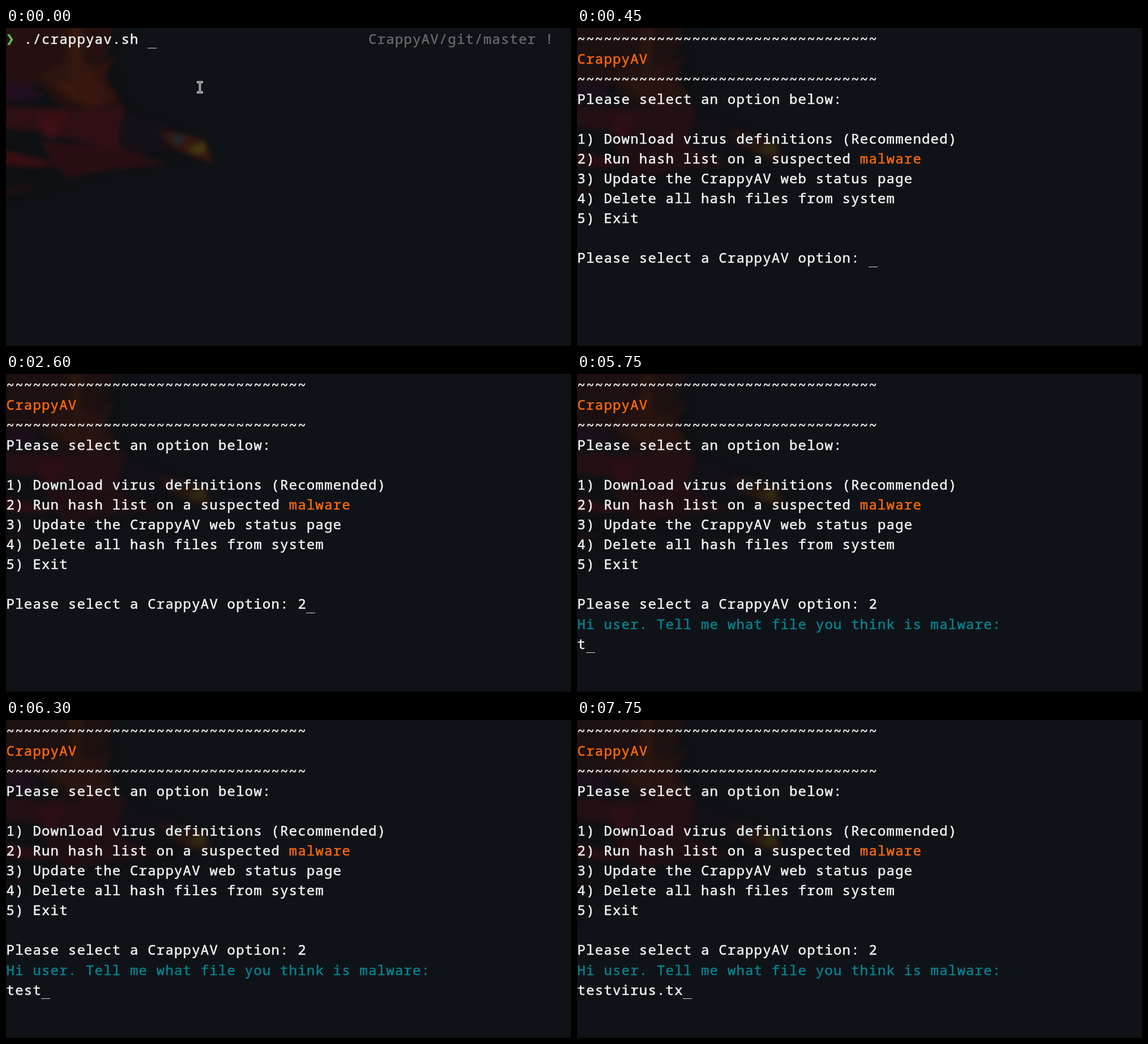
These frames come from a looping animation (998 by 561 pixels, 8 s). An HTML page with a canvas:

```html
<!DOCTYPE html>
<html lang="en">
<head>
<meta charset="utf-8">
<title>Terminal</title>
<style>
  html, body { margin: 0; width: 100%; height: 100%; overflow: hidden; background: #0f1317; }
  svg, canvas { position: absolute; left: 0; top: 0; }
  #wallpaper { filter: blur(5px); }
  #shade { filter: blur(16px); }
</style>
</head>
<body>
<svg width="998" height="561" viewBox="0 0 998 561">
  <path id="shade" fill="#0e1014" d="M-40-40H190L220 130 350 190 350 235 200 265 60 305-40 340Z"/>
  <g id="wallpaper">
    <path fill="#24110f" d="M-20-20H195L172 75 205 135 100 140 60 100H-20Z"/>
    <path fill="#2f150f" d="M60 85L105 60 112-20H140L135 60 165 70 195 45 172 90 200 130 150 142 110 125Z"/>
    <path fill="#38190f" d="M114-20H132L130 132 85 98 118 95Z"/>
    <path fill="#381510" d="M138 60L176 118 170 138 135 140Z"/>
    <path fill="#210f20" d="M-20 92L40 98 68 122-20 132Z"/>
    <path fill="#150f18" d="M208 145L290 172 350 198 270 216H195Z"/>
    <path fill="#2e1014" d="M-20 136L110 142 210 137 198 196 205 220 130 200 60 182-20 175Z"/>
    <path fill="#3c0f14" d="M58 152L110 150 85 198 64 190Z"/>
    <path fill="#2a0f12" d="M60 200L205 212 285 240 180 250 110 266 85 240Z"/>
    <path fill="#3a0e11" d="M-20 212L95 240 50 246-20 240Z"/>
    <path fill="#1e0f12" d="M-20 288L55 273 30 290-20 299Z"/>
    <path fill="#34180f" d="M270 181L318 188 352 198 366 238 325 226 290 208Z"/>
    <path fill="#182e38" d="M294 189L313 192 308 205 296 203Z"/>
    <path fill="#443a10" d="M320 213L350 200 354 220 335 222Z"/>
  </g>
  <path fill="#050607" d="M0 560H998V561H0Z"/>
</svg>
<canvas width="998" height="561"></canvas>
<script>
const ctx = document.querySelector('canvas').getContext('2d');
const wallpaper = document.getElementById('wallpaper');
const CELL = 15.6, ROW = 35.1, LOOP = 8000;
const WHITE = '#f4f5f5', ORANGE = '#ff6a0a', TEAL = '#078391', GRAY = '#66686a';
const rule = '~'.repeat(34);
const menu = [
  rule, '', rule, 'Please select an option below:', '',
  '1) Download virus definitions (Recommended)',
  '2) Run hash list on a suspected',
  '3) Update the CrappyAV web status page',
  '4) Delete all hash files from system',
  '5) Exit', '',
  'Please select a CrappyAV option:'
];
const keyTimes = [5750, 6000, 6050, 6300, 6650, 6750, 6900, 7000, 7100, 7300, 7400, 7750];

// A thin stroke gives the letters a medium weight.
function put(text, col, row, color = WHITE) {
  const x = col * CELL + 0.6, y = row * ROW + 28.3;
  ctx.fillStyle = ctx.strokeStyle = color;
  ctx.lineWidth = 0.5;
  ctx.fillText(text, x, y);
  ctx.strokeText(text, x, y);
}

function cursor(col, row) {
  ctx.fillStyle = '#d5d6d6';
  ctx.fillRect(Math.round(col * CELL), Math.round(row * ROW + 34.6), 16, 1);
}

function pointer(x, y) {
  const beam = new Path2D(`M${x - 3.5} ${y - 9}h7M${x - 3.5} ${y + 9}h7M${x} ${y - 9}v18`);
  ctx.lineCap = 'square';
  for (const [width, color] of [[3.4, '#fff'], [1, '#0f1317']]) {
    ctx.lineWidth = width;
    ctx.strokeStyle = color;
    ctx.stroke(beam);
  }
}

function drawPrompt(t) {
  ctx.fillStyle = '#5fb760';
  ctx.fill(new Path2D('M2 11h4.5l6 9.5-6 9.5H2l6-9.5Z'));
  put('./crappyav.sh', 2, 0);
  put('CrappyAV/git/master !', 41, 0, GRAY);
  cursor(16, 0);
  if (t < 400) pointer(342.5, 104.5);
}

function drawMenu(t) {
  menu.forEach((line, row) => put(line, 0, row));
  put('CrappyAV', 0, 1, ORANGE);
  put('malware', 32, 6, ORANGE);
  if (t >= 2600) put('2', 33, 11);
  if (t < 4300) return cursor(t < 2600 ? 33 : 34, 11);
  put('Hi user. Tell me what file you think is malware:', 0, 12, TEAL);
  const typed = keyTimes.filter(k => k <= t).length;
  put('testvirus.tx'.slice(0, typed), 0, 13);
  cursor(typed, 13);
}

function frame() {
  const t = performance.now() % LOOP;
  ctx.clearRect(0, 0, 998, 561);
  ctx.font = '24px "Noto Sans Mono", monospace';
  ctx.letterSpacing = '1.2px';
  wallpaper.style.opacity = t < 450 ? 1 : 0.65;
  (t < 450 ? drawPrompt : drawMenu)(t);
  requestAnimationFrame(frame);
}
frame();
</script>
</body>
</html>
```
